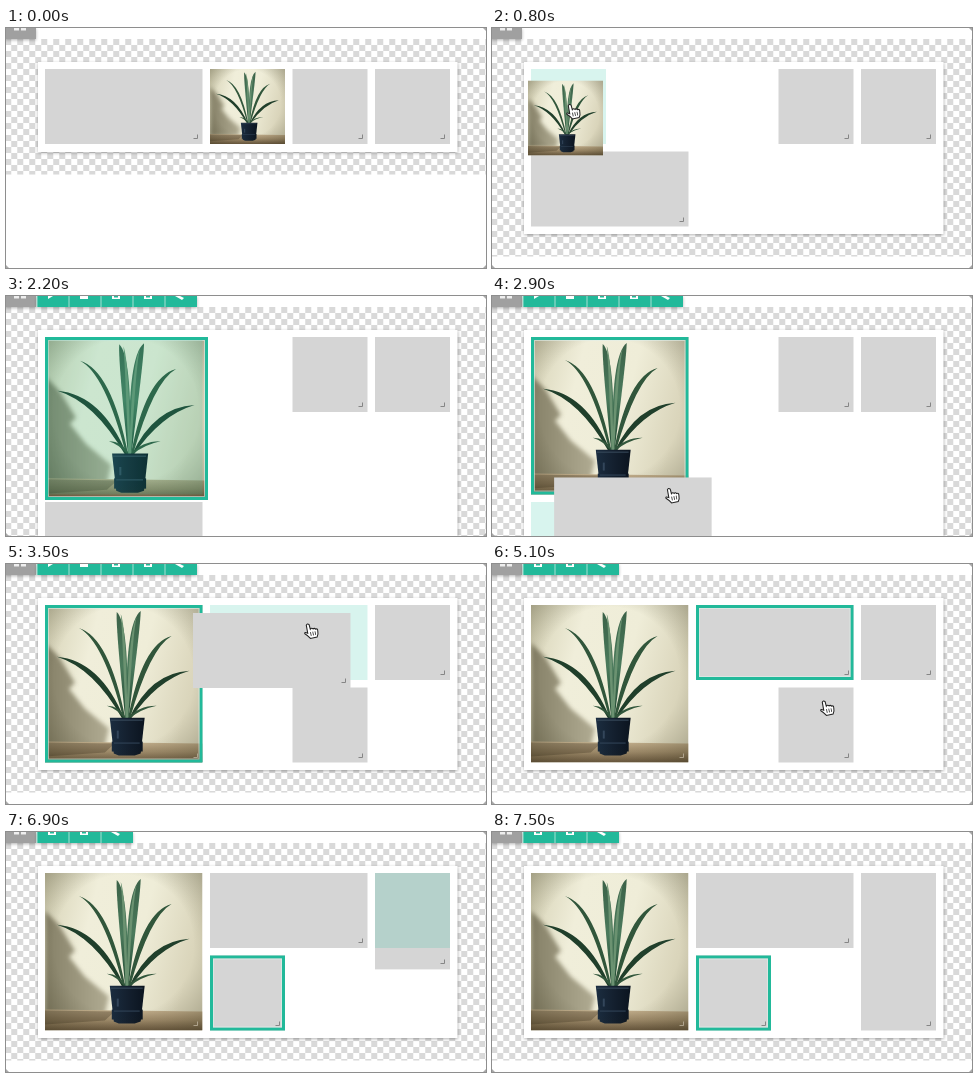
Write an HTML page with a canvas that moves like this. It is 480 px wide and 240 px high and loops after 7.6 s.

```html
<!DOCTYPE html>
<html lang="en">
<head>
<meta charset="utf-8">
<title>Grid editor</title>
<style>
  html, body { margin: 0; width: 100%; height: 100%; overflow: hidden; background: #fff; }
  canvas { display: block; width: 480px; height: 240px; }
</style>
</head>
<body>
<canvas id="stage" width="480" height="240"></canvas>
<script>
const ctx = document.getElementById('stage').getContext('2d');
const LOOP = 7600, STEP = 100;
const TEAL = '#22b99a', MINT = 'rgba(26,188,156,.17)', GREY = '#d5d5d5';
const UNIT = 75, PITCH = 82.5, WIDE = UNIT + PITCH;
const GROW_AT = 112;
const col = i => 39 + i * PITCH;
const row = i => 41 + i * PITCH;
const between = (t, a, b) => t >= a && t < b;

function progress(t, from, to) {
  return Math.min(1, Math.max(0, (t - from) / (to - from)));
}

// Eased share of a distance travelled between two times.
function slide(t, from, to, distance) {
  const k = progress(t, from, to);
  return distance * k * k * (3 - 2 * k);
}

function glide(t, from, to, a, b) {
  return a.map((v, i) => v + slide(t, from, to, b[i] - v));
}

function rect(x, y, w, h, fill) {
  ctx.fillStyle = fill;
  ctx.fillRect(x, y, w, h);
}

function gradient(x0, y0, x1, y1, ...colors) {
  const g = ctx.createLinearGradient(x0, y0, x1, y1);
  colors.forEach((c, i) => g.addColorStop(i / (colors.length - 1), c));
  return g;
}

function withShadow(paint) {
  ctx.save();
  ctx.shadowColor = 'rgba(0,0,0,.3)';
  ctx.shadowBlur = 3;
  ctx.shadowOffsetY = 1;
  paint();
  ctx.restore();
}

function makeChecker(cell) {
  const c = document.createElement('canvas');
  c.width = c.height = cell * 2;
  const g = c.getContext('2d');
  g.fillStyle = '#fff';
  g.fillRect(0, 0, cell * 2, cell * 2);
  g.fillStyle = '#d9d9d9';
  g.fillRect(0, 0, cell, cell);
  g.fillRect(cell, cell, cell, cell);
  return ctx.createPattern(c, 'repeat');
}
const checker = makeChecker(6);

function drawBoard(bottom) {
  ctx.save();
  ctx.translate(-.75, 11);
  rect(0, 0, 482, bottom + 11.5, checker);
  ctx.restore();
  withShadow(() => rect(32, 34, 419.5, bottom - 34, '#fff'));
}

function drawHandle(right, bottom, color) {
  const x = Math.round(right) - 5.5, y = Math.round(bottom) - 5.5;
  ctx.strokeStyle = color;
  ctx.lineWidth = 1;
  ctx.beginPath();
  ctx.moveTo(x, y - 4);
  ctx.lineTo(x, y);
  ctx.lineTo(x - 4, y);
  ctx.stroke();
}

function drawTile([x, y], w, h) {
  rect(x, y, w, h, GREY);
  drawHandle(x + w, y + h, '#858585');
}

function outline([x, y], w, h) {
  ctx.strokeStyle = TEAL;
  ctx.lineWidth = 3;
  ctx.strokeRect(x + 1.5, y + 1.5, w - 3, h - 3);
  ctx.strokeStyle = 'rgba(225,240,236,.6)';
  ctx.lineWidth = 1;
  ctx.strokeRect(x + 3.5, y + 3.5, w - 7, h - 7);
}

function shape(points, fill) {
  ctx.fillStyle = fill;
  ctx.beginPath();
  points.forEach(p => ctx.lineTo(p[0], p[1]));
  ctx.fill();
}

// Tapered leaf that rises from the pot and bends out to its tip.
function leaf(tx, ty, width, fill) {
  const bx = 82 + (tx - 82) * .05, by = 114;
  const cx = bx + (tx - bx) * .4, cy = ty + (by - ty) * .12;
  const d = Math.hypot(tx - bx, ty - by);
  const nx = (by - ty) / d * width, ny = (tx - bx) / d * width;
  ctx.fillStyle = fill;
  ctx.beginPath();
  ctx.moveTo(bx - 1, by);
  ctx.quadraticCurveTo(cx - nx, cy - ny, tx, ty);
  ctx.quadraticCurveTo(cx + nx, cy + ny, bx + 1, by);
  ctx.fill();
}

// The plant picture, laid out on a 158 x 158 field.
function drawPlant([x, y], size) {
  ctx.save();
  ctx.translate(x, y);
  ctx.scale(size / 158, size / 158);
  ctx.beginPath();
  ctx.rect(0, 0, 158, 158);
  ctx.clip();

  rect(0, 0, 158, 158, gradient(0, 0, 158, 40, '#d5d1b4', '#f0eeda', '#efedd8', '#dad5bb'));
  ctx.filter = 'blur(2px)';
  shape([[0, 38], [14, 52], [30, 78], [24, 84], [40, 104], [64, 124], [60, 142], [0, 142]],
    gradient(0, 0, 70, 0, '#858067', '#b5b097'));
  ctx.filter = 'none';

  shape([[0, 137], [158, 139], [158, 158], [0, 158]],
    gradient(0, 137, 0, 158, '#c0ad8b', '#a08c6b', '#6b5940'));
  shape([[0, 138], [70, 139], [60, 148], [0, 152]], 'rgba(50,40,25,.3)');

  const dark = '#203f2b', mid = '#31563b';
  leaf(34, 23, 3.5, mid);
  leaf(12, 52, 5, dark);
  leaf(127, 31, 4.5, mid);
  leaf(145, 66, 5, dark);
  leaf(62, 101, 2, mid);
  leaf(112, 101, 2, mid);
  const blade = gradient(0, 8, 0, 114, '#3b6248', '#4b7a5c', '#1f4630');
  leaf(72, 7, 7, blade);
  leaf(96, 6, 8, blade);
  leaf(76, 9, 2, '#6b9271');
  leaf(92, 12, 2, '#6b9271');

  const clay = gradient(65, 0, 100, 0, '#1b2d40', '#14202f', '#0b141f');
  shape([[65, 113], [100, 113], [96, 149], [90, 151], [74, 151], [69, 149]], clay);
  rect(67, 137, 31, 10, clay);
  rect(66, 115, 32, 1, '#3a4c5e');
  rect(69, 138, 26, 1, '#33465a');
  rect(72, 126, 2, 8, '#33465a');

  const edge = ctx.createRadialGradient(79, 72, 70, 79, 79, 118);
  edge.addColorStop(0, 'rgba(45,42,18,0)');
  edge.addColorStop(1, 'rgba(45,42,18,.35)');
  rect(0, 0, 158, 158, edge);
  ctx.restore();
}

function drawToolbar(count) {
  withShadow(() => {
    rect(-1, 0, 31, 11, '#a0a0a0');
    if (count) rect(31, 0, count * 32, 11, TEAL);
  });
  for (const x of [8, 15]) rect(x, 0, 5, 2.5, '#eee');
  for (let i = 0; i < count; i++) {
    const x = 31 + i * 32, icon = i + 5 - count;
    rect(x - .5, 0, 1, 11, '#a5dfd1');
    const cx = x + 15;
    if (icon === 0) shape([[cx - 4, 0], [cx + 1, 0], [cx - 4, 3]], '#fff');
    else if (icon === 4) shape([[cx - 5, 0], [cx, 0], [cx + 4, 2], [cx + 2, 4]], '#fff');
    else {
      rect(cx - 4, 0, 8, 3, '#fff');
      if (icon > 1) rect(cx - 2, 0, 4, 1.5, TEAL);
    }
  }
}

function drawCursor([x, y]) {
  ctx.save();
  ctx.translate(x - .5, y);
  ctx.rotate(-.2);
  ctx.scale(.95, .95);
  ctx.beginPath();
  ctx.moveTo(-1.5, 1);
  ctx.quadraticCurveTo(0, -1, 1.5, 1);
  ctx.lineTo(1.8, 6);
  ctx.quadraticCurveTo(3.5, 4.5, 4.7, 6.3);
  ctx.quadraticCurveTo(6.3, 5.2, 7.2, 7);
  ctx.quadraticCurveTo(9.5, 6.4, 9.2, 9);
  ctx.quadraticCurveTo(9.2, 13, 7.2, 15.5);
  ctx.lineTo(0, 15.5);
  ctx.quadraticCurveTo(-2, 12, -4.8, 9.5);
  ctx.quadraticCurveTo(-5, 7, -1.7, 9.5);
  ctx.closePath();
  ctx.fillStyle = '#fff';
  ctx.fill();
  ctx.strokeStyle = '#222';
  ctx.lineWidth = 1.1;
  ctx.stroke();
  for (let i = 0; i < 3; i++) rect(1 + i * 2.4, 9, .8, 4, '#222');
  ctx.restore();
}

function drawCorners() {
  for (const [x, y] of [[480, 0], [0, 240], [480, 240]]) {
    const dx = x ? -3 : 3, dy = y ? -3 : 3;
    shape([[x, y], [x + dx, y], [x, y + dy]], '#a9a9a9');
  }
}

function pose(t) {
  return {
    photo: [
      col(2) + slide(t, 200, 800, -168) + slide(t, 900, 1200, 3),
      row(0) + slide(t, 200, 500, 11.5) + slide(t, 900, 1200, -11.5)],
    size: UNIT + 88 * progress(t, 1300, 2100) - slide(t, 2200, 2400, 5.5),
    wide: [
      col(0) + slide(t, 2700, 3500, 148) + slide(t, 3500, 4000, 17),
      row(0) + slide(t, 400, 700, PITCH) + slide(t, 1600, 1900, PITCH)
        + slide(t, 2700, 3500, -157) + slide(t, 3500, 4000, -8)],
    third: [
      col(3) + slide(t, 5100, 5700, -PITCH),
      row(0) + slide(t, 3100, 3400, PITCH)],
    tall: UNIT + slide(t, 6700, 7300, PITCH),
    bottom: 124 + slide(t, 400, 700, 82) + slide(t, 1600, 1900, PITCH) - slide(t, 3200, 3500, PITCH)
  };
}

// Landing place of the tile being dragged.
function dropSpot(t, p) {
  if (between(t, 300, 1100)) {
    const i = Math.max(0, Math.round((p.photo[0] - col(0)) / PITCH));
    return [col(i), row(0), UNIT, UNIT];
  }
  if (between(t, 2800, 4000)) {
    return t < 3100 ? [col(0), row(2), WIDE, UNIT] : [col(2), row(0), WIDE, UNIT];
  }
  if (between(t, 5200, 5700)) return [col(t < 5400 ? 3 : 2), row(1), UNIT, UNIT];
}

// Snapped size of the tile being resized.
function resizeSpot(t, p) {
  const snap = size => size > GROW_AT ? WIDE : UNIT;
  if (between(t, 1400, 2300)) return [col(0), row(0), snap(p.size), snap(p.size)];
  if (between(t, 6700, 7300)) return [col(4), row(0), UNIT, snap(p.tall)];
}

function cursorAt(t, p) {
  const held = ([x, y], dx, dy) => [x + dx, y + dy];
  if (between(t, 100, 1100)) return held(p.photo, 42, 24);
  if (between(t, 1100, 1400)) return glide(t, 1100, 1300, [79, 68], [106, 106]);
  if (between(t, 2500, 2700)) return glide(t, 2500, 2700, [190, 200], [154, 217]);
  if (between(t, 2700, 4000)) return held(p.wide, 115, 11);
  if (between(t, 4000, 5200)) return glide(t, 4200, 4800, [319, 52], [332, 137]);
  if (between(t, 5200, 5700)) return held(p.third, 45.5, 13.5);
  if (between(t, 5700, 6500)) return glide(t, 5900, 6400, [249, 137], [411, 106]);
}

function draw(t) {
  const p = pose(t);
  rect(0, 0, 480, 240, '#fff');
  drawBoard(p.bottom);

  const drop = dropSpot(t, p), resize = resizeSpot(t, p);
  if (drop) rect(...drop, MINT);

  const drawPhoto = () => {
    drawPlant(p.photo, p.size);
    if (t >= 2400) drawHandle(p.photo[0] + WIDE, p.photo[1] + WIDE, 'rgba(200,190,170,.7)');
    if (between(t, 1200, 4200)) outline(p.photo, p.size, p.size);
  };
  const photoOnTop = t < 2500;
  if (!photoOnTop) drawPhoto();
  drawTile(p.third, UNIT, UNIT);
  drawTile([col(4), row(0)], UNIT, p.tall);
  drawTile(p.wide, WIDE, UNIT);
  if (photoOnTop) drawPhoto();
  if (resize) rect(...resize, MINT);

  if (between(t, 4200, 5800)) outline(p.wide, WIDE, UNIT);
  if (t >= 5800) outline(p.third, UNIT, UNIT);

  drawToolbar(t < 1200 ? 0 : t < 4200 ? 5 : 3);
  const hand = cursorAt(t, p);
  if (hand) drawCursor(hand);
  drawCorners();
}

const start = performance.now();
function tick() {
  const t = (performance.now() - start) % LOOP;
  draw(Math.floor(t / STEP) * STEP);
  requestAnimationFrame(tick);
}
tick();
</script>
</body>
</html>
```
